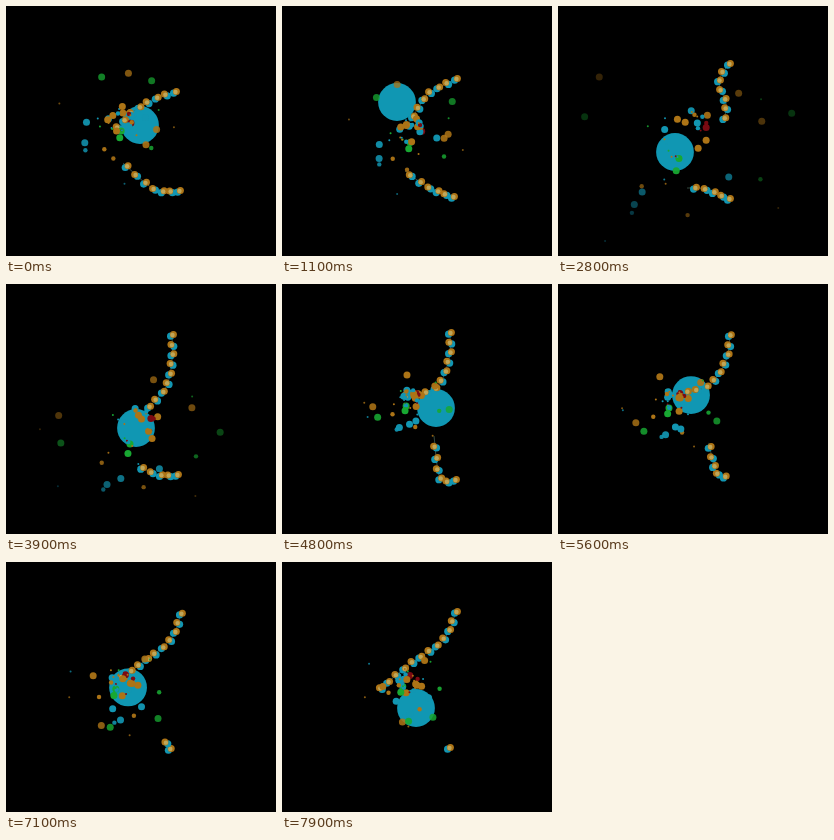
Recreate the animation shown at these times as an HTML page with a canvas. Size 270x250 px, loop 8000 ms.

```html
<!DOCTYPE html>
<html lang="en">
<head>
<meta charset="utf-8">
<title>Ball and chains</title>
<style>
html, body { margin: 0; width: 100%; height: 100%; overflow: hidden; background: #000; }
canvas { display: block; }
</style>
</head>
<body>
<canvas id="stage" width="270" height="250"></canvas>
<script>
const ctx = document.getElementById('stage').getContext('2d');
const LOOP = 8000, STEP = 100;
const TEAL = '#1296b2', ORANGE = '#ad7416', GREEN = '#18a832', RED = '#7c0a12', TAN = '#bfa659';

// Key poses: ball centre, a few points on each chain, and the cloud as x, y, spread.
const poses = [
  { at: 0, ball: [134, 119], cloud: [112, 117, 27],
    top: [169, 86, 148, 93, 127, 106, 110, 123], low: [173, 185, 148, 183, 117, 157] },
  { at: 1100, ball: [115, 96], cloud: [127, 128, 27],
    top: [174, 73, 147, 87, 137, 101, 124, 122], low: [171, 191, 146, 181, 123, 165] },
  { at: 2800, ball: [117, 146], cloud: [125, 135, 56],
    top: [171, 58, 161, 75, 168, 98, 166, 114], low: [171, 193, 147, 183, 129, 182] },
  { at: 3900, ball: [130, 144], cloud: [130, 148, 42],
    top: [166, 51, 166, 76, 160, 103, 142, 124], low: [171, 191, 153, 191, 134, 183] },
  { at: 4800, ball: [154, 124], cloud: [128, 117, 20],
    top: [168, 49, 167, 75, 154, 104, 124, 112], low: [173, 196, 158, 194, 152, 152] },
  { at: 6300, ball: [115, 107], cloud: [109, 124, 27],
    top: [175, 53, 168, 77, 147, 99, 125, 109], low: [162, 189, 158, 181, 150, 170] },
  { at: 7900, ball: [134, 146], cloud: [127, 123, 20],
    top: [174, 50, 161, 78, 128, 102, 98, 127], low: [167, 186, 167, 186, 167, 186] }
];

let seed = 11;
function random() {
  seed = (seed * 16807) % 2147483647;
  return seed / 2147483647;
}

const beads = Array.from({ length: 46 }, (_, i) => ({
  angle: i * 2.4 + random(),
  dist: 0.3 + 2 * random() ** 3,
  spin: random() - 0.5,
  size: [3.5, 2.2, 1, 3.5, 1][i % 5],
  color: i % 12 === 0 ? RED : i % 6 === 3 ? GREEN : i % 2 ? TEAL : ORANGE
}));

const clamp = (v, lo, hi) => Math.max(lo, Math.min(hi, v));

function catmull(a, b, c, d, u) {
  return b + 0.5 * u * (c - a + u * (2 * a - 5 * b + 4 * c - d + u * (3 * (b - c) + d - a)));
}

function poseAt(key, t) {
  const last = poses.length - 1;
  let i = 0;
  while (i < last - 1 && t >= poses[i + 1].at) i++;
  const u = clamp((t - poses[i].at) / (poses[i + 1].at - poses[i].at), 0, 1);
  const [a, b, c, d] = [-1, 0, 1, 2].map(n => poses[clamp(i + n, 0, last)][key]);
  return b.map((v, k) => catmull(a[k], v, c[k], d[k], u));
}

function curve(p) {
  const n = p.length / 2;
  const at = (j, axis) => p[2 * clamp(j, 0, n - 1) + axis];
  const points = [];
  for (let s = 0; s <= (n - 1) * 40; s++) {
    const j = Math.min(n - 2, Math.floor(s / 40)), u = s / 40 - j;
    points.push([0, 1].map(x => catmull(at(j - 1, x), at(j, x), at(j + 1, x), at(j + 2, x), u)));
  }
  return points;
}

function disc(x, y, r, color) {
  ctx.fillStyle = color;
  ctx.beginPath();
  ctx.arc(x, y, r, 0, 7);
  ctx.fill();
}

// Paired beads hang on a thin line, each gap a little wider than the one before.
function drawChain(p, gap, stretch) {
  const points = curve(p);
  ctx.strokeStyle = '#4c6a5c';
  ctx.lineWidth = 0.8;
  ctx.beginPath();
  points.forEach(([x, y]) => ctx.lineTo(x, y));
  ctx.stroke();
  let left = 0, side = 1.4, [px, py] = points[0];
  for (const [x, y] of points) {
    left -= Math.hypot(x - px, y - py);
    [px, py] = [x, y];
    if (left > 0) continue;
    disc(x - side, y + 1.2, 3.6, TEAL);
    disc(x + side, y - 0.6, 3.5, ORANGE);
    disc(x + side / 3, y, 2.2, TAN);
    left += gap;
    gap *= stretch;
    side = -side;
  }
}

function drawCloud([cx, cy, spread], t) {
  for (const b of beads) {
    const a = b.angle + b.spin * t / 1000, r = b.dist * spread;
    ctx.globalAlpha = clamp(1.25 - r / 100, 0.3, 1);
    disc(cx + r * Math.cos(a), cy + r * Math.sin(a), b.size, b.color);
  }
  ctx.globalAlpha = 1;
}

function draw(t) {
  ctx.fillStyle = '#000';
  ctx.fillRect(0, 0, 270, 250);
  disc(...poseAt('ball', t), 18.9, '#1097b3');
  drawChain(poseAt('top', t), 9.5, 1.01);
  drawChain(poseAt('low', t), 7.5, 1.12);
  drawCloud(poseAt('cloud', t), t);
}

const start = performance.now();
function tick() {
  const t = (performance.now() - start) % LOOP;
  draw(Math.floor(t / STEP) * STEP);
  requestAnimationFrame(tick);
}
tick();
</script>
</body>
</html>
```
